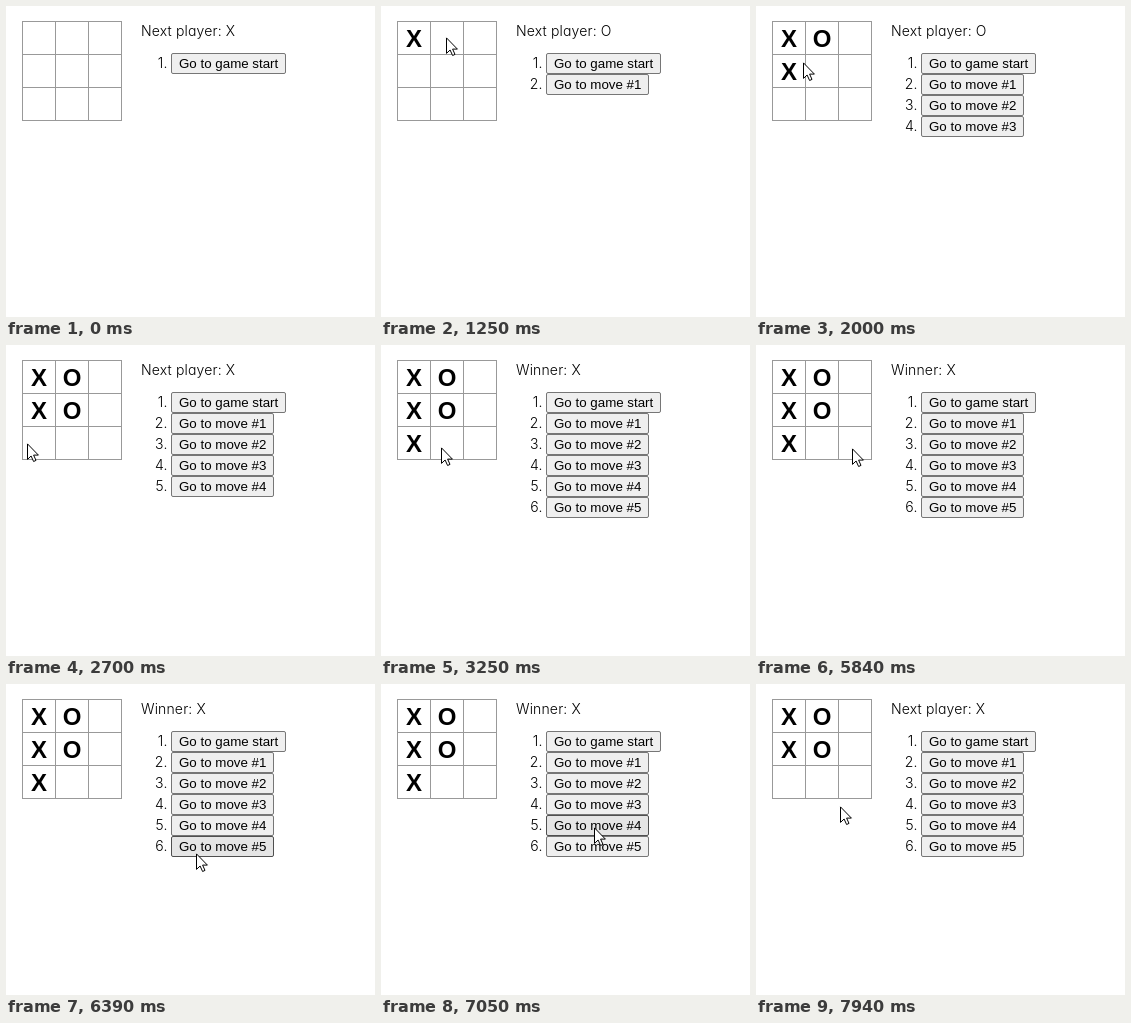
Write an HTML page that moves like this. It is 369x311 px and loops after 8 s.

```html
<!DOCTYPE html>
<html lang="en">
<head>
<meta charset="utf-8">
<title>Tic-tac-toe</title>
<style>
html, body { margin: 0; width: 100%; height: 100%; overflow: hidden; background: #fff; }
svg { display: block; width: 100%; height: 100%; }
.label { font: 300 14px Inter, "Open Sans", sans-serif; font-feature-settings: "cv11"; letter-spacing: .15px; }
.num { text-anchor: end; }
.btn rect { fill: #efefef; stroke: #767676; }
.btn.hover rect { fill: #e5e5e5; stroke: #4f4f4f; }
.btn text { font: 13.333px "Liberation Sans", Arial, sans-serif; }
.mark { font: bold 24px "Liberation Sans", Arial, sans-serif; text-anchor: middle; }
</style>
</head>
<body>
<svg viewBox="0 0 369 311">
  <g id="board" stroke="#999"></g>
  <g id="marks"></g>
  <text id="status" class="label" x="135" y="30"></text>
  <g id="list"></g>
  <circle id="ring" r="12" fill="#ff0" fill-opacity=".47"/>
  <path id="cursor" d="M.5 .9V16.4L4.1 13 6.6 18.5 9 17.4 6.6 12.1H11.4Z" fill="#fff" stroke="#000"/>
</svg>
<script>
const LOOP = 8000, FRAME = 1000 / 15;
const LEFT = 16, TOP = 15, CELL = 33;
const LIST_X = 165, LIST_Y = 47, ROW = 21, MAX_MOVES = 5;
const ENTER = 130, PRESS = 70, RELEASE = 140;
const $ = id => document.getElementById(id);

// Where the pointer stops: arrival time, x, y, and whether it clicks there
const stops = [
  [0, 154, 215], [900, 41, 40, true], [1290, 65, 31, true], [1860, 47, 56, true],
  [2280, 66, 67, true], [2690, 21, 98, true], [3250, 60, 102, true], [4090, 74, 78],
  [4450, 71, 96, true], [5050, 94, 102], [6320, 190, 169], [6600, 213, 154],
  [7050, 213, 143], [7380, 213, 143, true], [7940, 84, 122]
];

function add(parent, tag, attrs, text = "") {
  const el = document.createElementNS("http://www.w3.org/2000/svg", tag);
  for (const k in attrs) el.setAttribute(k, attrs[k]);
  el.textContent = text;
  return parent.appendChild(el);
}

const player = i => i % 2 ? "O" : "X";
const show = (el, on) => el.setAttribute("visibility", on ? "visible" : "hidden");
const ease = p => p < .5 ? 4 * p ** 3 : 1 - 4 * (1 - p) ** 3;

for (let i = 0; i < 4; i++) {
  const x = LEFT + i * CELL + .5, y = TOP + i * CELL + .5;
  add($("board"), "line", { x1: x, x2: x, y1: TOP, y2: TOP + 100 });
  add($("board"), "line", { x1: LEFT, x2: LEFT + 100, y1: y, y2: y });
}

const marks = Array.from({ length: 9 }, (_, i) => add($("marks"), "text", {
  class: "mark", x: LEFT + 17 + i % 3 * CELL, y: TOP + 26 + Math.floor(i / 3) * CELL
}));

const rows = Array.from({ length: MAX_MOVES + 1 }, (_, i) => {
  const y = LIST_Y + ROW * i, w = i ? 103 : 115;
  const row = add($("list"), "g", {});
  add(row, "text", { class: "label num", x: LIST_X - 3.5, y: y + 15 }, i + 1 + ".");
  const btn = add(row, "g", {});
  add(btn, "rect", { x: LIST_X + .5, y: y + .5, width: w - 1, height: ROW - 1, rx: 1.5 });
  add(btn, "text", { x: LIST_X + 8, y: y + 15 }, i ? "Go to move #" + i : "Go to game start");
  return { row, btn, w };
});

const rowAt = (x, y) => {
  const i = Math.floor((y - LIST_Y) / ROW);
  return rows[i] && x >= LIST_X && x < LIST_X + rows[i].w ? i : -1;
};

const hasLine = cells => [0, 1, 2].some(i =>
  [0, 1, 2].every(j => cells.includes(i + 3 * j)) || [0, 1, 2].every(j => cells.includes(3 * i + j)));

// Replays every click up to time t.
function game(t) {
  const moves = [];
  let step = 0, won = false;
  for (const [at, x, y, click] of stops) {
    if (!click || t < at + RELEASE) continue;
    const row = rowAt(x, y);
    if (row >= 0) {
      step = row;
    } else if (!won) {
      moves.push(Math.floor((x - LEFT) / CELL) + 3 * Math.floor((y - TOP) / CELL));
      step = moves.length;
    }
    won = hasLine(moves.slice(0, step).filter((_, i) => i % 2 === (step - 1) % 2));
  }
  return { moves, step, won };
}

// Longer trips take longer; the pointer rests until it must set off.
function pointer(t) {
  t = Math.round(t / FRAME) * FRAME;
  const next = stops.findIndex(s => s[0] > t);
  if (next < 0) return stops[stops.length - 1].slice(1, 3);
  const [t0, x0, y0] = stops[next - 1], [t1, x1, y1] = stops[next];
  const time = Math.min(t1 - t0 - RELEASE, 250 + 2.5 * Math.hypot(x1 - x0, y1 - y0));
  const p = ease(Math.max(0, 1 - (t1 - t) / time));
  return [Math.round(x0 + (x1 - x0) * p), Math.round(y0 + (y1 - y0) * p)];
}

function render(t) {
  const { moves, step, won } = game(t);
  marks.forEach((m, cell) => {
    const i = moves.indexOf(cell);
    m.textContent = i >= 0 && i < step ? player(i) : "";
  });
  $("status").textContent = won ? "Winner: " + player(step - 1) : "Next player: " + player(step);

  const pos = pointer(t), inside = t >= ENTER;
  const over = inside ? rowAt(...pos) : -1;
  rows.forEach(({ row, btn }, i) => {
    show(row, i <= moves.length);
    btn.setAttribute("class", i === over ? "btn hover" : "btn");
  });

  show($("cursor"), inside);
  show($("ring"), stops.some(([at, , , click]) => click && t >= at + PRESS && t < at + RELEASE));
  for (const id of ["cursor", "ring"]) $(id).setAttribute("transform", `translate(${pos})`);
}

const start = performance.now();
function tick() {
  render((performance.now() - start) % LOOP);
  requestAnimationFrame(tick);
}
tick();
</script>
</body>
</html>
```
